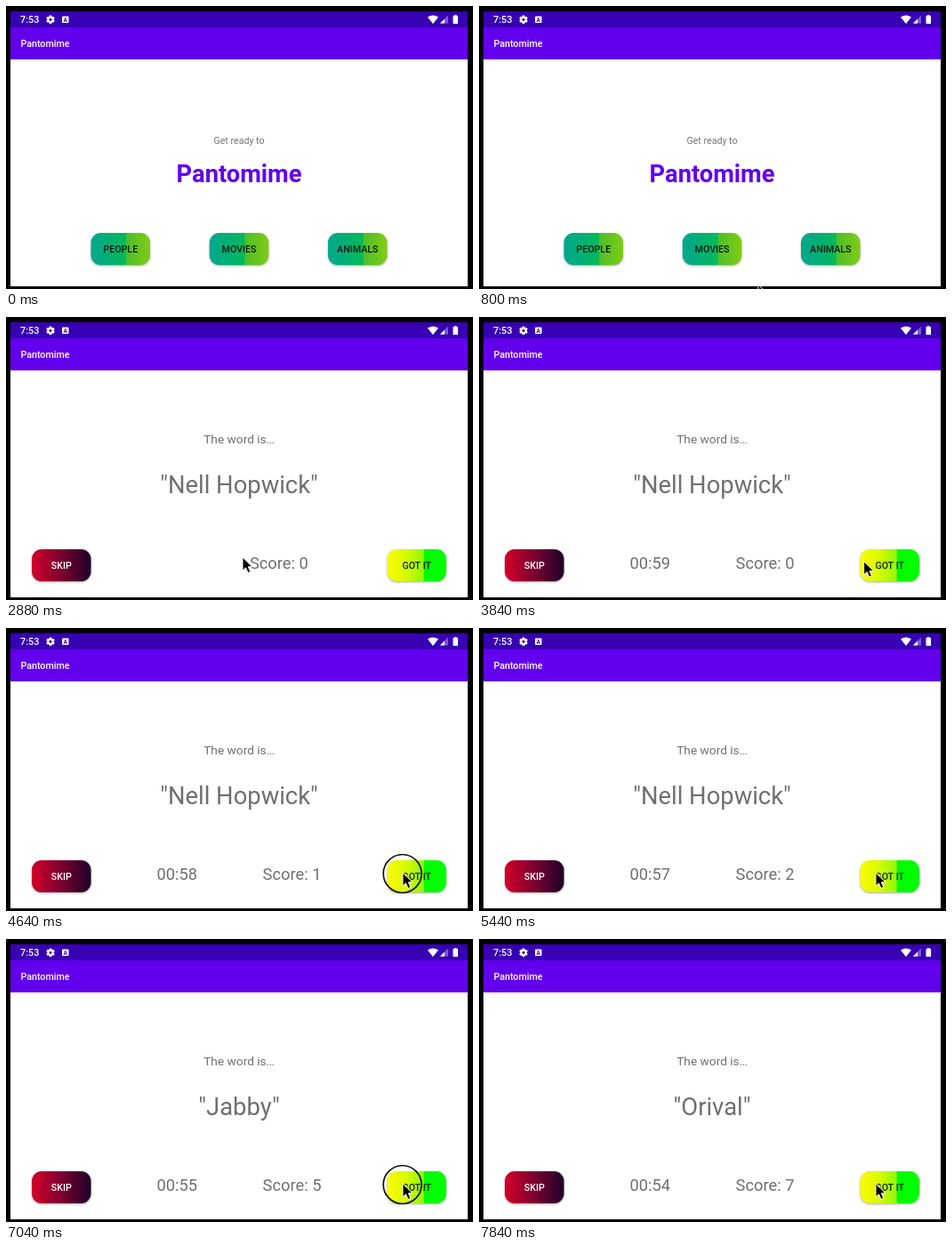
Write an HTML page with a canvas that moves like this. It is 525 px wide and 318 px high and loops after 8 s.

```html
<!DOCTYPE html>
<html lang="en">
<head>
<meta charset="utf-8">
<title>Pantomime</title>
<style>
  html, body { margin: 0; width: 100%; height: 100%; overflow: hidden; background: #000; }
  canvas { display: block; width: 525px; height: 318px; }
</style>
</head>
<body>
<canvas id="stage"></canvas>
<script>
const W = 525, H = 318, LOOP = 8000, STEP = 160;
const canvas = document.getElementById('stage');
const ctx = canvas.getContext('2d');
const ratio = window.devicePixelRatio || 1;
canvas.width = Math.round(W * ratio);
canvas.height = Math.round(H * ratio);

const GREY = '#6f6f6f', INK = '#0b1a10';
const OPEN = 2720, TIMER_START = 3040, TICK = 950;
const WORDS = [[0, 'Nell Hopwick'], [3, 'Jabby'], [6, 'Orival']];
const POINTS = [4480, 5120, 5760, 6240, 6880, 7200, 7520];
const CLICKS = [2400, ...POINTS];
const RING_TIME = 320;
// time, x, y of the pointer tip
const PATH = [
  [640, 316, 322], [800, 314, 313], [1280, 285, 285], [1600, 268, 269],
  [2400, 268, 269], [2560, 266, 270], [3040, 266, 270], [4000, 446, 275]
];

const HOME = [[0, '#02a78f'], [0.58, '#03b95a'], [0.61, '#4fbf2a'], [1, '#82cb14']];
const SKIP = [[0, '#d4002a'], [0.5, '#7c0030'], [1, '#1c0028']];
const GOT = [[0, '#fbfb00'], [0.3, '#dcfa00'], [0.61, '#92f808'], [0.63, '#00fb00'], [1, '#00ff00']];

function rect(x, y, w, h, color) {
  ctx.fillStyle = color;
  ctx.fillRect(x, y, w, h);
}

function shape(points, color) {
  ctx.beginPath();
  points.forEach(([x, y]) => ctx.lineTo(x, y));
  ctx.closePath();
  ctx.fillStyle = color;
  ctx.fill();
}

function text(str, x, y, size, color, weight = 400, align = 'center') {
  ctx.font = `${weight} ${size}px Roboto, sans-serif`;
  ctx.textAlign = align;
  ctx.fillStyle = color;
  ctx.fillText(str, x, y);
}

function button(label, x, y, stops, color) {
  const w = 66.5, h = 36;
  const fill = ctx.createLinearGradient(x, 0, x + w, 0);
  stops.forEach(([at, c]) => fill.addColorStop(at, c));
  ctx.save();
  ctx.shadowColor = 'rgba(0,0,0,0.35)';
  ctx.shadowBlur = 2.5 * ratio;
  ctx.shadowOffsetY = ratio;
  ctx.beginPath();
  ctx.roundRect(x, y, w, h, 11);
  ctx.fillStyle = fill;
  ctx.fill();
  ctx.restore();
  text(label, x + w / 2, y + 22, 10.67, color, 500);
}

function gear(x, y) {
  ctx.save();
  ctx.translate(x, y);
  for (let i = 0; i < 6; i++) {
    ctx.rotate(Math.PI / 3);
    rect(-1.3, -4.8, 2.6, 3, '#fff');
  }
  ctx.beginPath();
  ctx.arc(0, 0, 2.7, 0, 7);
  ctx.lineWidth = 2;
  ctx.strokeStyle = '#fff';
  ctx.stroke();
  ctx.restore();
}

function statusBar() {
  rect(5, 6, 514, 18, '#3700b3');
  text('7:53', 16, 19, 10.8, '#fff', 500, 'left');
  gear(50, 15.3);
  ctx.beginPath();
  ctx.roundRect(63, 11.5, 7.5, 7.5, 1);
  ctx.fillStyle = '#fff';
  ctx.fill();
  text('A', 66.75, 17.6, 6.5, '#3700b3', 700);

  ctx.beginPath();
  ctx.moveTo(480, 20);
  ctx.lineTo(474, 12.5);
  ctx.quadraticCurveTo(480, 8.5, 486, 12.5);
  ctx.closePath();
  ctx.fillStyle = '#fff';
  ctx.fill();
  shape([[488, 19.5], [497, 19.5], [497, 10.5]], 'rgba(255,255,255,0.35)');
  shape([[488, 19.5], [493, 19.5], [493, 14.5]], '#fff');
  rect(504, 10, 2.6, 2, '#fff');
  ctx.beginPath();
  ctx.roundRect(502.5, 11, 5.6, 9, 0.8);
  ctx.fillStyle = '#fff';
  ctx.fill();
}

function frame() {
  rect(0, 0, W, H, '#000');
  rect(5, 60, 514, 255, '#fff');
  rect(5, 24, 514, 36, '#6200ee');
  statusBar();
  text('Pantomime', 16.5, 46, 10.67, '#fff', 500, 'left');
}

function home() {
  text('Get ready to', 262, 154.5, 10.67, '#757575');
  text('Pantomime', 262, 198, 27.3, '#6200ee', 700);
  button('PEOPLE', 95.5, 255, HOME, INK);
  button('MOVIES', 228.8, 255, HOME, INK);
  button('ANIMALS', 362, 255, HOME, INK);
}

function game(t) {
  const score = POINTS.filter(p => t >= p).length;
  const word = WORDS.filter(([from]) => score >= from).pop()[1];
  text('The word is…', 262, 142, 13.7, GREY);
  text(`"${word}"`, 262, 198, 27.4, GREY);
  if (t >= TIMER_START) {
    const left = 59 - Math.floor((t - TIMER_START) / TICK);
    text('00:' + left, 192.3, 283, 18.3, GREY);
    text('Score: ' + score, 321.5, 283, 18.3, GREY);
  } else {
    text('Score: ' + score, 306.8, 283, 18.3, GREY);
  }
  button('SKIP', 29, 261, SKIP, '#fff');
  button('GOT IT', 428.5, 261, GOT, '#082808');
}

function pointerAt(t) {
  if (t < PATH[0][0]) return null;
  const i = PATH.findIndex(p => p[0] > t);
  if (i < 0) return PATH[PATH.length - 1].slice(1);
  const [t0, x0, y0] = PATH[i - 1], [t1, x1, y1] = PATH[i];
  const u = (t - t0) / (t1 - t0), k = u * u * (3 - 2 * u);
  return [x0 + (x1 - x0) * k, y0 + (y1 - y0) * k];
}

function pointer(t) {
  const at = pointerAt(t);
  if (!at) return;
  ctx.save();
  ctx.translate(at[0], at[1]);
  if (CLICKS.some(c => t >= c && t < c + RING_TIME)) {
    ctx.beginPath();
    ctx.arc(-0.3, 1, 21.5, 0, 7);
    ctx.lineWidth = 1.7;
    ctx.strokeStyle = '#111';
    ctx.stroke();
  }
  shape([[0, 0], [0, 15], [3.5, 11.8], [6, 17.5], [8.8, 16.3], [6.4, 10.8], [11, 10.6]], '#000');
  ctx.lineWidth = 1;
  ctx.lineJoin = 'round';
  ctx.strokeStyle = '#fff';
  ctx.stroke();
  ctx.restore();
}

function draw(now) {
  const t = Math.floor((now % LOOP) / STEP) * STEP;
  ctx.setTransform(ratio, 0, 0, ratio, 0, 0);
  frame();
  if (t < OPEN) home(); else game(t);
  pointer(t);
}

const start = performance.now();
function loop() {
  draw(performance.now() - start);
  requestAnimationFrame(loop);
}
loop();
</script>
</body>
</html>
```
